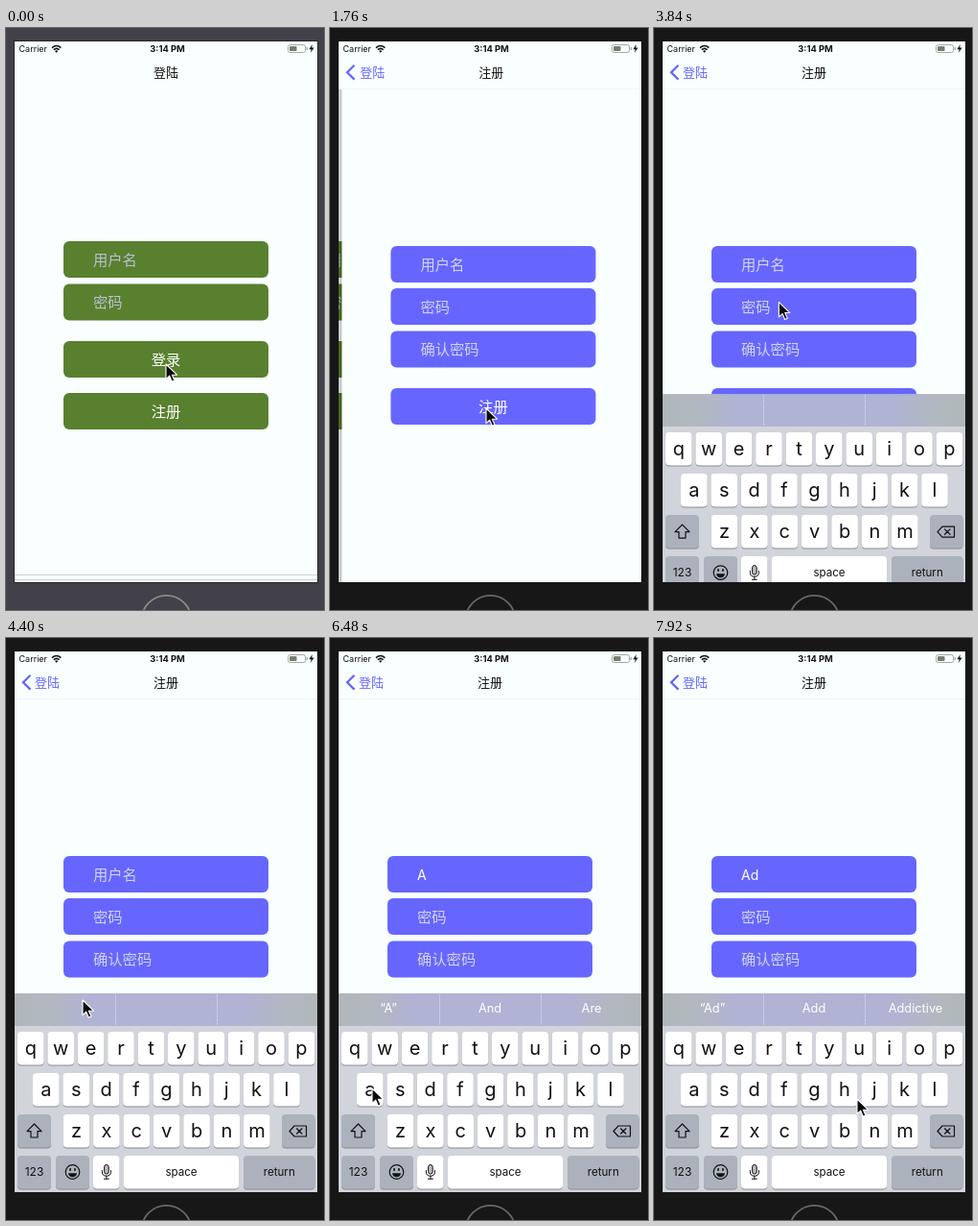
An HTML page that plays this animation: 332x606 px, repeating every 8000 ms.

```html
<!DOCTYPE html>
<html lang="zh">
<head>
<meta charset="utf-8">
<style>
html, body { margin: 0; width: 100%; height: 100%; overflow: hidden; background: #171717; }
svg { display: block; width: 332px; height: 606px; }
text { font-family: Inter, "Noto Sans CJK SC", "Noto Sans CJK", sans-serif; white-space: pre; }
</style>
</head>
<body>
<svg id="stage" viewBox="0 0 332 606">
  <defs>
    <clipPath id="screen"><rect x="9" y="14" width="316" height="563"/></clipPath>
    <linearGradient id="barFill">
      <stop offset="0" stop-color="#b1b8bb"/>
      <stop offset=".12" stop-color="#b1b8c0"/>
      <stop offset=".24" stop-color="#b0b3d4"/>
      <stop offset=".76" stop-color="#b0b3d4"/>
      <stop offset=".9" stop-color="#b1b8c0"/>
      <stop offset="1" stop-color="#b1b8bb"/>
    </linearGradient>
  </defs>
</svg>
<script>
const LOOP = 8000, STEP = 80;
const PAPER = '#f9ffff', GREEN = '#59802f', BLUE = '#6666ff';
const stage = document.getElementById('stage');

function add(parent, tag, attrs = {}, label) {
  const el = document.createElementNS('http://www.w3.org/2000/svg', tag);
  for (const k in attrs) el.setAttribute(k, attrs[k]);
  if (label !== undefined) el.textContent = label;
  parent.append(el);
  return el;
}
const group = (parent, attrs) => add(parent, 'g', attrs);
const rect = (p, x, y, width, height, fill, rx = 0) =>
  add(p, 'rect', { x, y, width, height, fill, rx });
const line = (p, d, stroke, width = 1, more = {}) =>
  add(p, 'path', { d, stroke, 'stroke-width': width, fill: 'none', ...more });
const label = (p, s, x, y, size, fill, weight = 400, anchor = 'middle') =>
  add(p, 'text', { x, y, 'font-size': size, fill, 'font-weight': weight, 'text-anchor': anchor }, s);
const show = (el, on) => el.setAttribute('visibility', on ? 'visible' : 'hidden');
const shift = (el, x, y = 0) => el.setAttribute('transform', `translate(${x} ${y})`);

function field(p, y, hint, color, ink) {
  rect(p, 60, y, 214, 38, color, 6);
  return label(p, hint, 91, y + 24.8, 15.3, ink, 300, 'start');
}
function button(p, y, name, color) {
  const box = rect(p, 60, y, 214, 38, color, 6);
  label(p, name, 167, y + 24.8, 15.3, '#fff');
  return box;
}

// Phone body
const bezel = rect(stage, 0, 0, 332, 606, '#171717');
const edge = add(stage, 'rect', { x: 8.5, y: 13.5, width: 317, height: 564, fill: 'none', stroke: '#26262b' });
const home = add(stage, 'circle', { cx: 167.5, cy: 616.8, r: 26, fill: 'none', 'stroke-width': 1.8 });

const screen = group(stage, { 'clip-path': 'url(#screen)' });
rect(screen, 9, 14, 316, 563, PAPER);

// Login page
const login = group(screen);
field(login, 222, '用户名', GREEN, '#bcc0d2');
field(login, 266.5, '密码', GREEN, '#bcc0d2');
button(login, 326, '登录', GREEN);
const signUp = button(login, 380, '注册', GREEN);
const footLines = line(login, 'M9 569.5H325M9 574.5H325', '#cdd3d3');
const shade = rect(screen, 9, 63, 316, 514, '#000');

// Register page
const register = group(screen);
rect(register, 9, 63, 316, 514, PAPER);
const nameText = field(register, 227, '用户名', BLUE, '#d3d3ec');
field(register, 271, '密码', BLUE, '#d3d3ec');
field(register, 315.5, '确认密码', BLUE, '#d3d3ec');
button(register, 375, '注册', BLUE);

// Navigation and status bars
rect(screen, 9, 14, 316, 49, PAPER);
const navLine = line(screen, 'M9 63.5H325', '#eff4f5');
const loginTitle = label(screen, '登陆', 167, 50.6, 13, '#111', 500);
const registerTitle = label(screen, '注册', 167, 50.6, 13, '#111', 500);
const chevron = line(screen, 'M25.5 38.8L18 46.2L25.5 53.6', BLUE, 2.3);
const backText = label(screen, '登陆', 30, 50.6, 13, BLUE, 400, 'start');

label(screen, 'Carrier', 13.5, 25, 9, '#111', 400, 'start');
line(screen, 'M48 20.6Q52.7 16.4 57.4 20.6M49.8 22.6Q52.7 20 55.6 22.6', '#111', 1.6);
add(screen, 'path', { d: 'M51 24Q52.7 22.6 54.4 24L52.7 25.8Z', fill: '#111' });
label(screen, '3:14 PM', 168.5, 25.2, 9.4, '#111', 700);
add(screen, 'rect', { x: 294.5, y: 17.5, width: 18, height: 8, rx: 2, fill: 'none', stroke: '#a3a8a3' });
rect(screen, 296, 19, 7.5, 5, '#72806f', .8);
rect(screen, 313.6, 20, 1.3, 3, '#a3a8a3');
add(screen, 'path', { d: 'M319.8 17L316.4 22.2H318.8L317.8 26L321.6 20.6H319.2Z', fill: '#111' });

// Keyboard
const keyboard = group(screen);
rect(keyboard, 9, 370, 316, 34, 'url(#barFill)');
rect(keyboard, 9, 404, 316, 173, '#d1d4da');
line(keyboard, 'M114.5 371V403M220.5 371V403', '#d5d9e6', 1, { 'stroke-dasharray': '1.5 1' });
const hints = [61, 167, 273].map(x => label(keyboard, '', x, 390.3, 12.8, '#fff'));

function key(x, y, w, s = '', size = 20, dark = false) {
  rect(keyboard, x, y + 1, w, 34.5, '#898c92', 4);
  rect(keyboard, x, y, w, 34.5, dark ? '#acb2bc' : '#fff', 4);
  if (s) label(keyboard, s, x + w / 2, y + (size > 15 ? 23.6 : 20.6), size, '#111');
}
[['qwertyuiop', 12, 410], ['asdfghjkl', 28, 453], ['zxcvbnm', 59.7, 496]].forEach(([row, x, y]) =>
  [...row].forEach((c, i) => key(x + i * 31.4, y, 27.6, c)));
key(12, 496, 35, '', 0, true);
key(288, 496, 34.5, '', 0, true);
key(12, 539, 35, '123', 12, true);
key(52, 539, 35, '', 0, true);
key(91, 539, 27.5);
key(123, 539, 120, 'space', 11.6);
key(248, 539, 74.5, 'return', 11.6, true);

const ink = (d, w = 1.2) => line(keyboard, d, '#111', w, { 'stroke-linejoin': 'round', 'stroke-linecap': 'round' });
ink('M29.5 506L37 513.6H33V520H26V513.6H22Z');
ink('M296 513.5L301 508H313.5V519H301ZM303.5 510.8L309 516.2M309 510.8L303.5 516.2');
add(keyboard, 'circle', { cx: 69.5, cy: 556, r: 7.3, fill: 'none', stroke: '#111', 'stroke-width': 1.2 });
rect(keyboard, 66.2, 552, 1.7, 3, '#111', .8);
rect(keyboard, 71.1, 552, 1.7, 3, '#111', .8);
add(keyboard, 'path', { d: 'M65 557.2H74Q73.4 561.2 69.5 561.2T65 557.2Z', fill: '#111' });
add(keyboard, 'rect', { x: 102.6, y: 548.5, width: 4.6, height: 9.6, rx: 2.3, fill: '#bbb', stroke: '#111' });
ink('M100.4 554.5V556Q100.4 560.2 104.9 560.2T109.4 556V554.5M104.9 560.2V563.2M102.4 563.2H107.4', 1);

const pointer = add(stage, 'path', {
  d: 'M0 0V15.6L3.7 12.2L6.3 18.2L9 17L6.4 11.2H11.5Z',
  fill: '#0b0b0b', stroke: '#fff', 'stroke-width': 1.1, 'stroke-linejoin': 'round'
});

// Pointer stops: time, x, y
const PATH = [
  [0, 167, 350], [320, 167, 350], [1120, 164, 396], [1360, 164, 396], [1760, 163, 396],
  [2160, 163, 396], [2960, 152, 246], [3520, 152, 246], [4400, 80, 377], [5360, 44, 469],
  [6480, 44, 469], [7120, 106, 469], [7360, 106, 469], [7920, 212, 480], [8000, 212, 480]
];
// Typed text and suggestions: time, field text, three hints
const TYPED = [
  [0, '用户名', '', '', ''],
  [6000, 'A', '“A”', 'And', 'Are'],
  [7200, 'Ad', '“Ad”', 'Add', 'Addictive']
];
const ACTIVE = 1200, PRESS = 1280, PUSH = 1400, KEYS = 3560;

const smooth = u => u * u * (3 - 2 * u);
// Share of the way still to go in a critically damped slide
function rest(t, start, pace) {
  const u = Math.max(0, t - start) / pace;
  return u > 14 ? 0 : (1 + u) * Math.exp(-u);
}
function pointerAt(t) {
  const i = Math.max(1, PATH.findIndex(p => p[0] > t));
  const [t0, x0, y0] = PATH[i - 1], [t1, x1, y1] = PATH[i];
  const u = smooth((t - t0) / (t1 - t0));
  return [x0 + (x1 - x0) * u, y0 + (y1 - y0) * u];
}

function draw(t) {
  const active = t >= ACTIVE;
  bezel.setAttribute('fill', active ? '#171717' : '#424149');
  home.setAttribute('stroke', active ? '#676767' : '#8b8b82');
  show(edge, !active);
  show(footLines, !active);
  signUp.setAttribute('fill', t >= PRESS && t < PUSH ? '#d2d6d8' : GREEN);

  const left = rest(t, PUSH, 55), done = 1 - left;
  shift(register, 316 * left);
  shift(login, -95 * done);
  shade.setAttribute('opacity', .2 * done);
  shift(registerTitle, 110 * left);
  shift(loginTitle, -124 * done);
  shift(backText, 124 * left);
  registerTitle.setAttribute('opacity', done);
  backText.setAttribute('opacity', done);
  chevron.setAttribute('opacity', done);
  navLine.setAttribute('opacity', done);
  loginTitle.setAttribute('opacity', Math.max(0, 1 - 2 * done));

  shift(keyboard, 0, 208 * rest(t, KEYS, 60));

  const [, typed, ...words] = TYPED.filter(r => r[0] <= t).pop();
  const empty = typed === TYPED[0][1];
  nameText.textContent = typed;
  nameText.setAttribute('fill', empty ? '#d3d3ec' : '#fff');
  nameText.setAttribute('font-size', empty ? 15.3 : 14);
  nameText.setAttribute('font-weight', empty ? 300 : 400);
  hints.forEach((h, i) => h.textContent = words[i]);

  shift(pointer, ...pointerAt(t));
}

const began = performance.now();
function tick() {
  const t = (performance.now() - began) % LOOP;
  draw(Math.floor(t / STEP) * STEP);
  requestAnimationFrame(tick);
}
tick();
</script>
</body>
</html>
```
